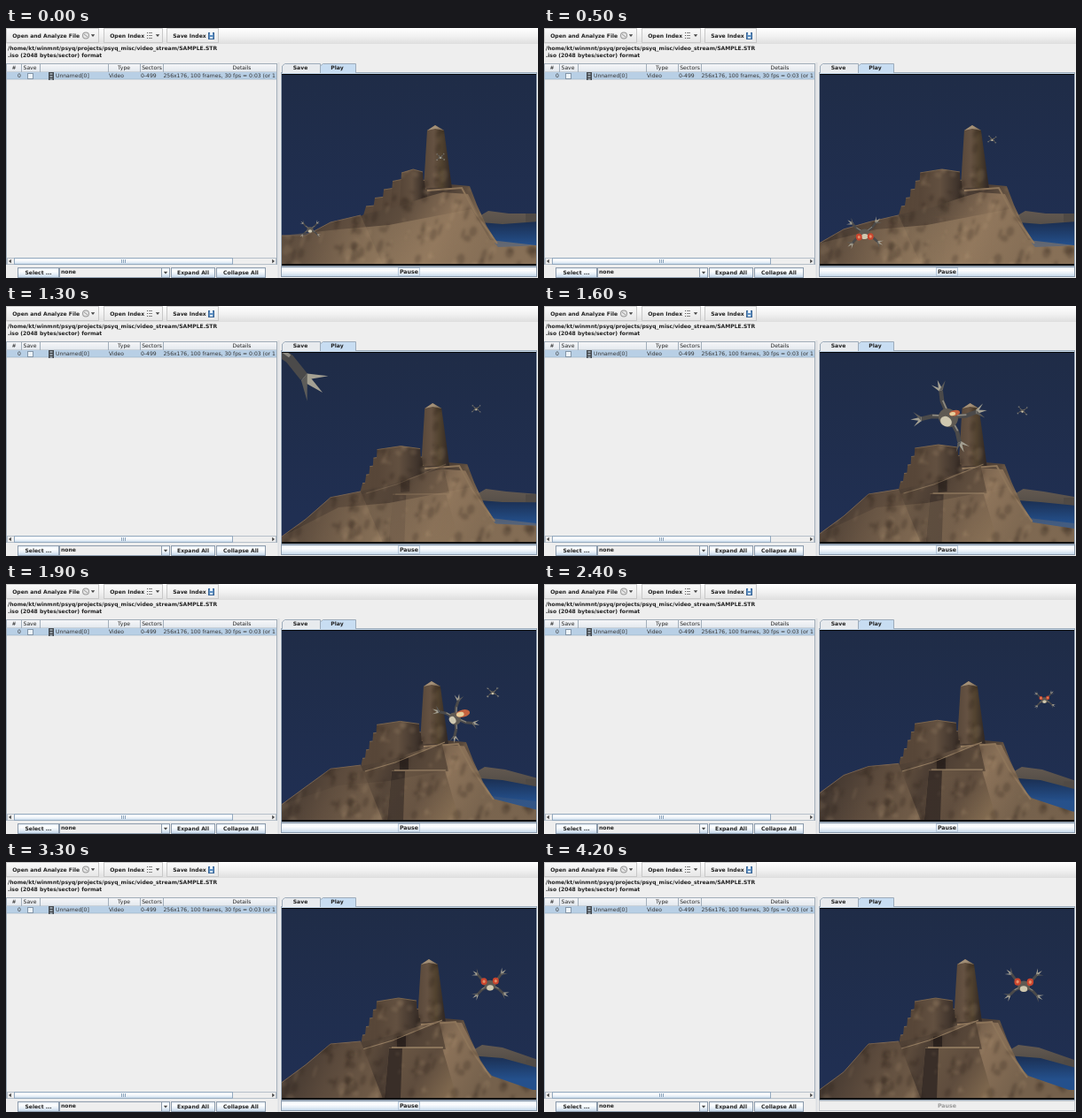
Write an HTML page with a canvas that moves like this. It is 600x283 px and loops after 4.3 s.

```html
<!DOCTYPE html>
<html lang="en">
<head>
<meta charset="utf-8">
<title>Video preview</title>
<style>
html, body { margin: 0; width: 100%; height: 100%; overflow: hidden; background: #eee; }
canvas { display: block; width: 600px; height: 283px; }
</style>
</head>
<body>
<canvas id="stage" width="600" height="283"></canvas>
<script>
const ctx = document.getElementById('stage').getContext('2d');
const LOOP = 4300, STEP = 100, TAU = Math.PI * 2;
const { sin, cos, exp, min, max } = Math;

const mix = (a, b, u) => a + (b - a) * u;
const sigmoid = x => 1 / (1 + exp(-x));

function random(seed) {
  return () => (seed = (seed * 16807) % 2147483647) / 2147483647;
}

function gradient(x0, y0, x1, y1, ...colors) {
  const g = ctx.createLinearGradient(x0, y0, x1, y1);
  colors.forEach((c, i) => g.addColorStop(i / (colors.length - 1), c));
  return g;
}

function polygon(points, dx = 0, dy = 0) {
  const p = new Path2D();
  for (let i = 0; i < points.length; i += 2) p.lineTo(points[i] + dx, points[i + 1] + dy);
  p.closePath();
  return p;
}

function fill(points, color, dx, dy) {
  const p = polygon(points, dx, dy);
  ctx.fillStyle = color;
  ctx.fill(p);
  return p;
}

function line(points, color, width = 1) {
  ctx.beginPath();
  for (let i = 0; i < points.length; i += 2) ctx.lineTo(points[i], points[i + 1]);
  ctx.strokeStyle = color;
  ctx.lineWidth = width;
  ctx.stroke();
}

function dot(x, y, rx, ry, color, turn = 0) {
  ctx.beginPath();
  ctx.ellipse(x, y, rx, ry, turn, 0, TAU);
  ctx.fillStyle = color;
  ctx.fill();
}

function box(x, y, w, h, color, border) {
  ctx.fillStyle = color;
  ctx.fillRect(x, y, w, h);
  if (border) {
    ctx.strokeStyle = border;
    ctx.lineWidth = 1;
    ctx.strokeRect(x + .5, y + .5, w - 1, h - 1);
  }
}

function text(s, x, y, { bold = true, size = 6.05, color = '#222', align = 'left' } = {}) {
  ctx.font = `${bold ? 'bold ' : ''}${size}px "DejaVu Sans", sans-serif`;
  ctx.fillStyle = color;
  ctx.textAlign = align;
  ctx.fillText(s, x, y);
}

// ---- Scenery: one layout, shifted by the approaching camera ----

function mottle(rocks, dx) {
  ctx.save();
  ctx.clip(rocks);
  ctx.filter = 'blur(1.5px)';
  const rnd = random(71);
  for (let i = 0; i < 300; i++) {
    const shade = rnd() < .6 ? 'rgba(28,20,16,.2)' : 'rgba(205,175,138,.13)';
    dot(305 + rnd() * 300 + dx, 110 + rnd() * 160, 1 + rnd() * 4, 1 + rnd() * 7, shade, .3);
  }
  ctx.restore();
}

function scenery(s) {
  const start = exp(-3 * s);              // opening swing
  const high = sigmoid((1.6 - s) * 4);    // height of the viewpoint
  const dx = 9 * (1 - s / 4.2);           // sideways drift
  const rocks = new Path2D();
  const rock = (...args) => rocks.addPath(fill(...args));

  box(311, 52, 287, 217, gradient(0, 53, 0, 240, '#1f2c47', '#202f52'));
  const shore = 224 - 14 * high;
  fill([518, 217, 535, 207, 558, 210, 598, shore, 598, shore + 12, 525, 222],
    gradient(0, 207, 0, 236, '#635950', '#4a4642'), dx);
  box(586, shore, 12, 11, '#504a45');
  fill([522, 219, 560, 222, 600, shore + 9, 600, 265, 535, 245],
    gradient(0, 220, 0, 246, '#1b2f52', '#24508c'));

  rock([458, 182, 492, 177, 514, 179, 522, 200, 533, 224, 545, 243, 500, 250, 450, 205],
    gradient(455, 180, 530, 215, '#44372f', '#4c3e34', '#79644e'), dx);
  rock([466, 116, 475, 110, 485, 116, 494, 181, 462, 181],
    gradient(464 + dx, 0, 492 + dx, 0, '#5a493b', '#655242', '#51422f', '#332a26'), dx);
  fill([466, 116, 475, 110, 485, 116, 475, 114], '#a39078', dx);

  // Terraced dome
  for (let i = 4; i >= 0; i--) {
    const left = 418 - 4 * i + start * (28 - 6 * i), right = 461 + 2 * i + dx;
    const y = 154 + 9.5 * i + 6 * high, mid = mix(left, right, .55);
    const top = [left, y + 4, mid, y, right, y + 3];
    rock([...top, right + 3, 208, left - 3, 212],
      gradient(left, 0, right, 0, '#574638', '#625040', '#3b3029'));
    line(top, '#80694f', .9);
  }

  // Slope down to the water
  const floor = 258 - 18 * high;
  rock([360, 268, 372, 214, 398, 204, 430, 197, 466, 185, 484, 180, 512, 182, 524, 206, 535, 230, 546, 242, 592, floor, 592, 270],
    gradient(400, 190, 530, 262, '#4c3e33', '#5d4c3d', '#8a7158', '#75614c'), dx, 6 * high);
  box(590, floor + 6 * high, 8, 40, '#75614c');
  line([466 + dx, 184, 505 + dx, 181, 520 + dx, 209, 545 + dx, 244], '#8d755a', 2);

  // Entrance wall
  ctx.globalAlpha = 1 - high * high;
  const rise = 4 * (1 - high);
  rock([398, 213, 432, 203, 490, 181, 497, 212, 433, 212, 428, 268, 380, 268],
    gradient(395, 205, 470, 235, '#6d5945', '#4a3c32', '#5a493a'), dx - 3);
  fill([444, 198, 454, 196, 454, 210, 444, 211], '#2e2521', dx - 5);
  fill([433, 210, 493, 210, 510, 268, 428, 268],
    gradient(440, 212, 505, 255, '#6a5744', '#5e4c3d', '#80694f'), dx - 3, 4 - rise);
  fill([433, 211, 448, 211, 446, 268, 428, 268], '#392e28', dx - 3, 4 - rise);
  line([433 + dx, 214 - rise, 491 + dx, 214 - rise], '#9a8366', 1.3);
  line([400 + dx, 212, 434 + dx, 202, 490 + dx, 179], '#927b60', 1.2);
  ctx.globalAlpha = 1;

  // Near ridge rises and falls with the flight
  const left = 248 - 13 * cos(TAU * s / 2.6), shoulder = 206 + 14 * high;
  const crest = [311, left, 338, left - 20 * (1 - start), 366, shoulder, 400, shoulder - 3 - 5 * high];
  rock([...crest, 425, 268, 311, 268], gradient(320, 222, 408, 262, '#41362f', '#5b4a3c', '#6d5946'));
  line(crest, '#786350', 1);

  // Sunlit sand while seen from above
  ctx.save();
  ctx.globalAlpha = .55 * high;
  fill([311, left, 375, 228, 432, 223, 525, 205, 546, 240, 598, 246, 598, 268, 311, 268],
    gradient(340, 235, 500, 262, '#75604b', '#a68b6b', '#967c60'));
  ctx.restore();
  mottle(rocks, dx);
}

// ---- Flying machines ----

function leg(angle, size) {
  const c = cos(angle), s = sin(angle);
  const ex = c * size * .6, ey = s * size * .5;
  const hx = c * size * .9, hy = s * size * .95;
  line([0, 0, ex, ey, hx, hy], '#4b4a4a', max(1, size * .14));
  line([0, -size * .04, ex, ey - size * .04], '#8d8a82', max(.6, size * .05));
  for (const bend of [-.75, 0, .75]) {
    const a = angle + bend, r = size * .36, w = size * .07;
    fill([hx + s * w, hy - c * w, hx + cos(a) * r, hy + sin(a) * r, hx - s * w, hy + c * w],
      bend > 0 ? '#5d5c59' : '#a5a193');
  }
}

function machine({ x, y, size }, { eyeY = -.2, tilt = 0, flame = 0, eyes = size > 11 }) {
  ctx.save();
  ctx.translate(x, y);
  ctx.rotate(tilt);
  for (const a of [-.7, .6, Math.PI - .6, Math.PI + .7]) leg(a, size);
  dot(0, size * .04, size * .33, size * .3, '#5f5a53');
  dot(0, size * .18, size * .2, size * .16, '#cfc8b0');
  if (eyes) {
    for (const side of [-1, 1]) {
      dot(side * size * .34, size * eyeY, size * .18, size * .2, '#c9452e');
      dot(side * size * .34, size * eyeY, size * .08, size * .09, '#e58f68');
    }
  }
  ctx.rotate(-tilt);
  if (flame) {
    const r = size * flame;
    dot(r * .38, -r * .25, r * .36, r * .19, '#c4623f', -.2);
    dot(r * .24, -r * .2, r * .2, r * .12, '#e6cf9c', -.2);
  }
  ctx.restore();
}

// Straight flight through depth: 1 / size changes evenly
function flight(a, b, u) {
  const size = 1 / mix(1 / a.size, 1 / b.size, u);
  const q = (size - a.size) / (b.size - a.size);
  return { x: mix(a.x, b.x, q), y: mix(a.y, b.y, q), size };
}

function machines(s) {
  machine({
    x: min(490 + 31 * s, 541 + 36 * exp(-4 * (s - 2.8))),
    y: 140 - 24 * exp(-(((s - 1.2) / 1.2) ** 2)) + 15 * exp(-3 * s),
    size: 5 + 16 * sigmoid(3 * (s - 2.55)),
  }, { tilt: .3 * sin(5 * s) * exp(-s / 2) });

  if (s < 1.1) {
    const visitor = flight({ x: 343, y: 228, size: 11 }, { x: 425, y: 248, size: 47 }, s / .9);
    machine(visitor, { eyeY: .2, tilt: -.1 * s });
  }

  if (s >= 1.2 && s < 2.4) {
    const u = (s - 1.3) / .6;
    const leaving = flight({ x: 285, y: 35, size: 75 }, { x: 507, y: 152, size: 22 }, u);
    leaving.size *= min(1, max(0, (2.4 - s) / .5));
    machine(leaving, { eyes: false, tilt: mix(.1, 1, u), flame: min(1, max(0, u)) });
  }
}

// ---- Window ----

const EDGE = '#8c9bac';
const metal = (y, h) => gradient(0, y, 0, y + h, '#dde8f3', '#fff', '#e4edf6', '#b8cfe5');

function arrow(x, y, turn = 0) {
  ctx.save();
  ctx.translate(x, y);
  ctx.rotate(turn);
  fill([-2.2, -1.3, 2.2, -1.3, 0, 1.5], '#444');
  ctx.restore();
}

function button(label, x, y, w, h) {
  box(x, y, w, h, metal(y, h), EDGE);
  text(label, x + w / 2, y + h / 2 + 2, { align: 'center' });
}

function toolbar() {
  box(0, 0, 600, 18, gradient(0, 0, 0, 18, '#fff', '#f2f2f2', '#dedede'));
  for (const [x, w, label] of [[0, 105, 'Open and Analyze File'], [110, 67, 'Open Index'], [181, 59, 'Save Index']]) {
    box(x, 0, w, 17, gradient(0, 0, 0, 17, '#fbfbfb', '#e6e6e6'), '#c8c8c8');
    text(label, x + 7.2, 10.7);
  }
  dot(90, 8.5, 4, 4, '#999');
  dot(90, 8.5, 3, 3, '#e5e5e5');
  line([88, 7, 92, 10], '#999', 1);
  for (let y = 5; y < 13; y += 3) {
    box(159, y, 1, 1, '#555');
    box(161, y, 4, 1, '#888');
  }
  arrow(98, 8.6);
  arrow(171, 8.6);
  box(228, 5, 7, 8, '#5e90c2', '#3c6798');
  box(230, 5, 3, 3, '#e8f1fa');
  box(230, 10, 3, 2, '#d6e4f1');
  text('/home/kt/winmnt/psyq/projects/psyq_misc/video_stream/SAMPLE.STR', 2, 25);
  text('.iso (2048 bytes/sector) format', 2, 33);
}

function table() {
  const columns = [['#', 9, 17], ['Save', 27, 38], ['Type', 133, 115], ['Sectors', 164.5, 151], ['Details', 266, 177]];
  box(0, 40, 306, 228, '#eee', '#a0acb8');
  box(1, 41, 304, 9, gradient(0, 41, 0, 50, '#f5f6f8', '#e3e8ee'));
  line([0, 50, 305, 50], '#aeb8c3');
  for (const [label, x, edge] of columns) {
    line([edge + .5, 41, edge + .5, 50], '#a3afbb');
    text(label, x, 47.2, { bold: false, align: 'center' });
  }
  box(1, 50, 304, 8, '#b8cfe5');
  line([1, 58, 305, 58], '#99acc0', .6);
  box(24, 51, 7, 7, '#edf3f9', '#8496a8');
  box(48, 50, 6, 9, '#43484e');
  for (let y = 51; y < 59; y += 3) box(49.5, y, 3, 2, '#96a0a8');
  ctx.save();
  ctx.beginPath();
  ctx.rect(1, 50, 303, 9);
  ctx.clip();
  for (const [label, x] of [['0', 13], ['Unnamed[0]', 56], ['Video', 116], ['0-499', 152],
    ['256x176, 100 frames, 30 fps = 0:03 (or 1', 177.5]]) text(label, x, 56.4, { bold: false, color: '#333' });
  ctx.restore();

  box(1, 260, 304, 8, '#eee', '#b5bfc9');
  box(9, 260, 247, 8, metal(260, 8), '#94a9be');
  for (let x = 130; x < 135; x += 2) box(x, 262, 1, 4, '#8ba3bb');
  arrow(4.5, 264, Math.PI / 2);
  arrow(301.5, 264, -Math.PI / 2);
}

function controls(s) {
  button('Select ...', 13, 271, 47, 12);
  box(60, 271, 125, 12, '#eee', EDGE);
  text('none', 62, 278.4);
  box(175, 271, 10, 12, metal(271, 12), EDGE);
  arrow(180, 277);
  button('Expand All', 186, 271, 50, 12);
  button('Collapse All', 237, 271, 56, 12);

  const done = s >= 4.2;
  box(310, 270, 289, 12, done ? '#eee' : metal(270, 12), done ? '#c3c8cd' : EDGE);
  text('Pause', 454.5, 277.5, { align: 'center', color: done ? '#999' : '#222', size: 6.3 });
  if (!done) {
    ctx.strokeStyle = '#b4c6d8';
    ctx.strokeRect(442.5, 271.5, 24, 9);
  }
}

function tab(label, x, w, color) {
  const outline = [x, 51, x, 43, x + 3, 40.5, x + w, 40.5, x + w, 51];
  fill(outline, color);
  line(outline, '#9dabba');
  text(label, x + w / 2 - 1, 47.4, { align: 'center' });
}

function tabs() {
  line([307.5, 39, 307.5, 283], '#dcdfe3', 2);
  box(310, 50, 289, 220, '#c3d6e9', '#9dabba');
  tab('Save', 311.5, 43, '#e8ebee');
  tab('Play', 354.5, 40, '#c8ddf2');
}

function draw(s) {
  box(0, 0, 600, 283, '#eee');
  toolbar();
  table();
  tabs();
  ctx.save();
  ctx.beginPath();
  ctx.rect(311, 52, 287, 217);
  ctx.clip();
  scenery(s);
  machines(s);
  box(311, 52, 287, 1, '#050608');
  box(311, 267, 287, 2, '#08090b');
  ctx.restore();
  controls(s);
}

let shown = -1;
const began = performance.now();
function tick() {
  const t = Math.floor(((performance.now() - began) % LOOP) / STEP) * STEP;
  if (t !== shown) draw((shown = t) / 1000);
  requestAnimationFrame(tick);
}
tick();
</script>
</body>
</html>
```
